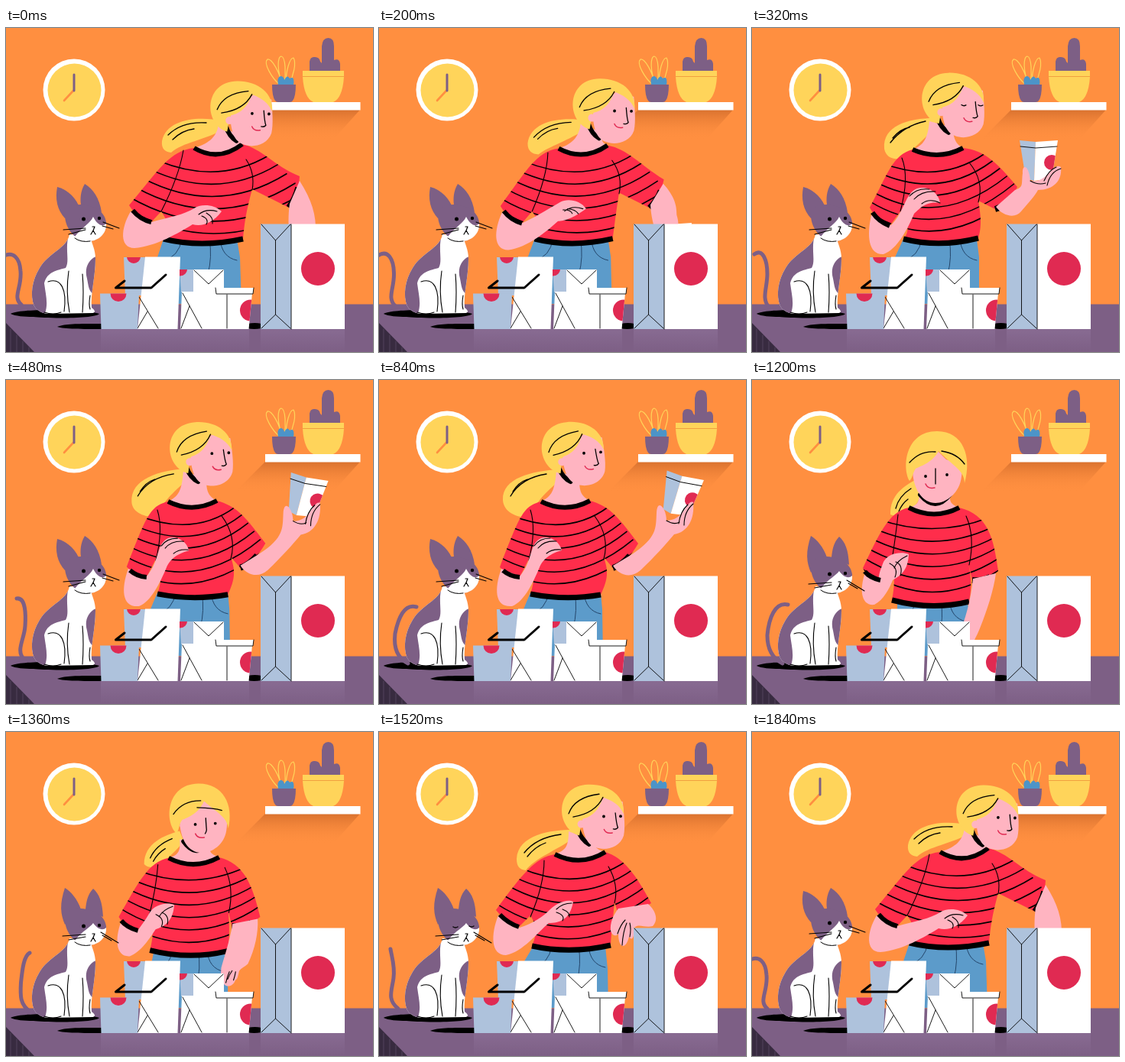
Write an HTML page with a canvas that moves like this. It is 480 by 424 pixels and loops after 1.88 s.

```html
<!DOCTYPE html>
<html lang="en">
<head>
<meta charset="utf-8">
<title>Unpacking dinner</title>
<style>
html, body { margin: 0; width: 100%; height: 100%; overflow: hidden; background: #ff8f40; }
canvas { display: block; width: 480px; height: 424px; }
</style>
</head>
<body>
<canvas id="stage" width="480" height="424"></canvas>
<script>
const g = document.getElementById('stage').getContext('2d');
const LOOP = 1880;
const C = {
  wall: '#ff8f40', plum: '#7d5f85', sun: '#ffd45a', red: '#ff2d4b', mark: '#e02a52',
  skin: '#ffb4c1', jeans: '#5c9bca', navy: '#24466b', side: '#aec2dc', ink: '#000', white: '#fff'
};
const NUM = /-?[\d.]+/g;
const nums = s => s.match(NUM).map(Number);
const lerp = (a, b, k) => a + (b - a) * k;

// Blends two path strings that share the same commands.
function mix(a, b, k) {
  const to = nums(b);
  let i = 0;
  return a.replace(NUM, v => lerp(+v, to[i++], k).toFixed(2));
}

function fill(path, color) {
  g.fillStyle = color;
  g.fill(new Path2D(path));
}
function line(path, w = 1.3, color = C.ink) {
  g.lineWidth = w;
  g.strokeStyle = color;
  g.stroke(new Path2D(path));
}
function dot(x, y, r, color) {
  g.fillStyle = color;
  g.beginPath();
  g.arc(x, y, r, 0, 7);
  g.fill();
}
function box(x, y, w, h, color) {
  g.fillStyle = color;
  g.fillRect(x, y, w, h);
}
function fade(y0, y1, from, to) {
  const grad = g.createLinearGradient(0, y0, 0, y1);
  grad.addColorStop(0, from);
  grad.addColorStop(1, to);
  return grad;
}
function clipped(path, draw) {
  g.save();
  g.clip(new Path2D(path));
  draw();
  g.restore();
}

const ease = {
  both: k => k * k * (3 - 2 * k),
  in: k => k ** 1.7,
  out: k => 1 - (1 - k) ** 2
};

// head: x, y, degrees, turn to the front; cup: x, y, degrees
const reach = {
  head: '53 15 4 0', cup: '388 330 0',
  pony: 'M282 122 C255 115 210 118 204 148 C203 158 208 162 216 163 C230 150 262 146 286 132Z',
  strand: 'M212 140 Q230 122 262 124 M218 146 Q230 134 246 132',
  neck: 'M278 125 C276 145 262 152 246 157 Q278 176 309 152 C304 150 302 148 303 140Z',
  shirt: 'M246 157 C215 160 200 185 161 232 Q172 250 190 254 L203 240 C214 255 212 265 206 276 Q255 288 310 276 C312 255 314 240 322 211 L370 235 Q384 215 384 194 C350 180 335 158 309 152 Q278 176 246 157Z',
  top: '200 174 278 206 345 166', low: '150 232 275 308 400 228',
  seam: 'M232 160 Q226 195 203 240 M314 172 Q326 190 322 212',
  pants: 'M206 276 L198 300 L196 361 L308 361 L306 300 L302 276Z',
  armL: 'M163 240 C150 262 148 288 168 288 C196 286 226 268 244 257 C256 260 270 256 282 240 C272 230 254 230 246 236 C234 244 212 248 190 254Z',
  tipsL: 'M276 240 Q262 236 252 244 M270 256 Q272 248 262 242 M262 257 Q266 250 256 246',
  armR: 'M371 230 C368 250 370 280 374 296 C378 310 382 315 386 318 C396 320 404 315 404 306 C404 300 404 295 404 290 C405 280 405 275 405 268 C406 245 400 225 384 200Z',
  tipsR: 'M396 306 Q390 310 388 316 M392 304 Q386 310 384 314 M380 306 Q384 310 388 308'
};
const lift = {
  head: '8 4 3 0', cup: '375 174 0',
  pony: 'M238 118 C205 118 170 128 173 158 C175 168 182 172 192 171 C205 165 220 150 242 128Z',
  strand: 'M181 150 Q198 128 227 122 M184 144 Q194 132 206 130',
  neck: 'M232 122 C230 145 224 154 210 159 Q244 174 276 157 C266 152 264 145 262 130Z',
  shirt: 'M210 159 C184 166 178 190 154 235 Q162 252 180 259 L194 240 C206 255 206 268 198 276 Q245 288 296 275 C300 260 300 250 296 226 L318 237 Q336 232 347 208 C322 178 305 160 276 157 Q244 174 210 159Z',
  top: '168 176 245 206 305 164', low: '148 238 245 304 352 214',
  seam: 'M196 170 Q206 195 194 240 M284 176 Q304 200 296 228',
  pants: 'M198 276 L187 300 L186 361 L297 361 L297 300 L294 276Z',
  armL: 'M156 245 C150 272 152 297 172 296 C190 290 204 262 212 243 C218 238 226 226 246 229 C244 214 228 206 216 210 C200 216 200 240 182 258Z',
  tipsL: 'M246 229 Q232 222 222 230 M240 214 Q222 213 212 224 M232 211 Q216 209 206 220',
  armR: 'M319 234 C328 246 344 250 352 240 C362 228 370 220 374 212 C394 212 406 200 404 182 C394 174 386 204 364 200 C362 178 353 178 354 190 C352 204 356 208 344 212Z',
  tipsR: 'M404 184 Q390 188 386 206 M398 182 Q388 186 382 200 M364 200 Q374 206 384 203'
};
const show = {
  head: '0 0 0 0', cup: '392 152 13',
  pony: 'M236 116 C200 118 162 130 164 160 C165 174 182 180 198 180 C204 160 215 150 240 128Z',
  strand: 'M172 152 Q186 128 219 123 M175 146 Q182 134 194 130',
  neck: 'M232 118 C230 145 226 152 212 159 Q244 175 276 158 C264 152 262 145 262 130Z',
  shirt: 'M212 159 C188 165 184 178 158 245 Q168 257 184 258 L196 234 C204 250 204 262 198 280 Q245 289 290 281 C300 260 300 250 294 232 L306 246 Q324 240 339 214 C310 175 300 165 276 158 Q244 175 212 159Z',
  top: '170 176 245 207 300 166', low: '150 243 245 300 340 220',
  seam: 'M198 170 Q206 195 196 236 M282 178 Q302 205 294 234',
  pants: 'M198 278 L189 300 L187 361 L293 361 L292 300 L290 278Z',
  armL: 'M160 247 C150 275 152 298 174 296 C190 290 202 264 210 245 C213 238 220 228 239 223 C236 210 222 203 212 207 C196 214 202 236 184 257Z',
  tipsL: 'M238 222 Q226 221 219 227 M232 211 Q216 210 208 220 M224 207 Q210 207 203 217',
  armR: 'M306 243 C314 256 330 260 342 249 C360 232 376 214 386 202 C404 199 413 182 411 160 C402 156 400 184 376 184 C376 168 364 154 363 174 C362 194 364 206 331 228Z',
  tipsR: 'M411 162 Q399 172 399 190 M404 163 Q394 172 392 188 M376 184 Q386 190 393 186'
};
const hold = { ...show, head: '-1 0 -1 0', cup: '394 151 14.5',
  pony: 'M236 117 C200 119 161 128 162 157 C163 174 182 181 199 180 C204 160 215 150 240 128Z' };
const place = {
  head: '-8 12 0 1', cup: '268 366 0',
  pony: 'M215 130 C200 138 180 150 181 176 C190 180 198 176 205 172 C215 165 220 155 222 145Z',
  strand: 'M188 168 Q192 152 208 142 M192 172 Q196 162 204 156',
  neck: 'M218 145 C220 160 216 164 205 167 Q238 184 271 167 C258 162 258 158 260 145Z',
  shirt: 'M205 167 C178 172 165 205 145 246 Q150 258 168 262 L182 240 C188 258 186 272 183 288 Q235 302 284 290 C288 270 286 255 283 240 L288 262 Q308 264 322 250 C316 205 308 176 271 167 Q238 184 205 167Z',
  top: '165 182 238 208 310 180', low: '136 242 236 312 330 244',
  seam: 'M191 176 Q188 205 182 242 M280 178 Q292 205 284 242',
  pants: 'M190 288 L190 305 L190 361 L286 361 L286 305 L280 288Z',
  armL: 'M148 252 C140 275 143 296 160 294 C172 288 180 272 184 262 C194 256 204 250 205 228 C196 224 178 226 172 238 C168 248 165 256 166 262Z',
  tipsL: 'M203 230 Q190 236 186 246 M194 256 Q198 242 188 238 M187 258 Q192 246 180 240',
  armR: 'M289 260 C286 290 278 315 272 330 C270 340 268 345 268 350 C272 358 284 358 288 350 C290 345 290 342 292 338 C294 334 296 330 298 325 C308 300 316 275 319 253Z',
  tipsR: 'M274 350 Q276 346 278 342 M280 350 Q282 346 284 342 M284 350 Q286 346 288 342'
};
const back = {
  head: '25 14 2 0', cup: '388 330 0',
  pony: 'M254 128 C225 128 182 134 180 166 C180 176 184 180 192 181 C204 165 232 155 256 138Z',
  strand: 'M190 158 Q206 138 238 134 M194 163 Q204 150 218 145',
  neck: 'M248 130 C248 150 244 155 230 160 Q264 177 296 157 C284 154 282 150 280 142Z',
  shirt: 'M230 160 C205 164 188 185 153 233 Q165 249 183 255 L198 240 C208 256 206 266 200 280 Q250 291 303 279 C304 260 306 245 308 222 L312 236 Q336 238 356 224 C335 185 320 165 296 157 Q264 177 230 160Z',
  top: '185 178 262 211 325 168', low: '145 236 256 312 368 222',
  seam: 'M216 168 Q216 200 198 242 M300 176 Q314 200 308 224',
  pants: 'M202 280 L190 300 L188 361 L300 361 L299 310 L296 280Z',
  armL: 'M156 240 C146 265 146 292 166 292 C188 288 208 262 222 250 C236 250 250 246 254 222 C246 218 232 224 224 232 C214 242 202 250 184 256Z',
  tipsL: 'M252 224 Q240 224 232 232 M249 242 Q250 236 240 232 M240 247 Q244 240 232 236',
  armR: 'M313 231 C306 240 302 250 303 260 C305 267 310 268 313 264 C313 284 323 285 327 268 C332 275 334 266 334 256 C340 250 348 257 358 254 C366 246 362 234 352 225Z',
  tipsR: 'M318 279 Q319 262 324 250 M312 264 Q316 252 322 246 M328 268 Q330 258 328 250'
};
const bodyKeys = [
  [0, reach], [80, reach], [320, lift, 'in'], [520, show, 'out'], [760, hold, 'both'], [880, hold],
  [1200, place, 'both'], [1520, back, 'in'], [1740, reach, 'out'], [LOOP, reach]
];

const curl = d => ({ d });
const tailLeft = curl('M-6 300 C10 290 18 302 19 318 C21 340 8 352 20 362');
const tailKeys = [
  [0, tailLeft], [80, tailLeft],
  [320, curl('M3 296 C14 288 20 304 20 322 C20 340 12 354 22 365'), 'both'],
  [480, curl('M14 286 C26 284 26 308 25 322 C24 340 12 354 24 366'), 'in'],
  [840, curl('M49 297 C33 292 25 312 21 332 C19 350 24 364 38 371'), 'out'],
  [1200, curl('M47 294 C30 290 22 312 20 334 C20 352 26 364 40 371'), 'both'],
  [1520, curl('M15 284 C17 296 21 306 19 322 C17 338 10 350 25 362'), 'both'],
  [1760, tailLeft, 'out'], [LOOP, tailLeft]
];

function poseAt(keys, t) {
  const i = keys.findIndex(k => k[0] > t);
  const [t0, a] = keys[i - 1], [t1, b, how] = keys[i];
  const k = how ? ease[how]((t - t0) / (t1 - t0)) : 0;
  const out = {};
  for (const part in a) out[part] = mix(a[part], b[part], k);
  return out;
}

// Each head part: side view, front view
const HEAD = {
  face: ['M240 92 C255 92 262 78 270 70 L293 76 C295 90 298 108 296 120 C292 135 275 140 265 138 C250 136 242 126 240 92Z',
    'M218 104 C228 92 243 90 250 80 L262 92 C284 98 284 104 282 114 C280 136 262 149 248 149 C232 149 218 132 218 104Z'],
  hair: ['M238 122 C206 114 203 58 247 55 C274 53 296 68 295 92 C290 80 278 74 267 71 C262 90 252 97 242 100 C238 105 240 112 238 122Z',
    'M214 120 C204 103 208 55 250 55 C284 55 296 88 286 123 C286 106 270 100 252 81 C244 96 230 100 222 104 C218 110 218 116 214 120Z'],
  locks: ['M223 94 Q230 72 262 67 M229 98 Q258 92 267 71', 'M214 96 Q228 80 248 82 M256 81 Q276 84 286 98'],
  nose: ['M284 91 Q286 106 288 110 Q286 113 282 112', 'M248 104 Q248 112 248 118 Q248 122 248 124'],
  smile: ['M270 113 Q273 119 281 117', 'M235 124 Q238 131 247 129'],
  band: ['M236 115 Q241 128 251 133', 'M228 138 Q248 162 267 138'],
  eyes: ['269 96 291 95', '235 114 263 112'],
  ear: ['240 107', '221 112']
};

function drawRoom() {
  box(0, 0, 480, 424, C.wall);
  dot(89, 81, 40.5, C.white);
  dot(89.5, 81.5, 35, C.sun);
  line('M88 82 L76 95', 2.6, C.wall);
  line('M89 61 L89 82', 3, C.plum);

  fill('M339 107 L463 107 L428 146 L300 146Z', fade(107, 146, '#d9722f', 'rgba(255,143,64,0)'));
  box(339, 97, 124.5, 10.5, C.white);
  line('M358 74 C348 66 336 46 342 41 C348 40 358 58 361 74 M362 74 C354 56 355 37 360 37 C366 38 366 60 364 74 M366 74 C366 56 371 39 376 39 C380 46 376 62 370 74', 1.2, C.sun);
  fill('M356 75 Q354 64 359 63 Q363 63 364 68 Q368 60 371 66 Q378 62 376 75Z', '#4c94c8');
  fill('M348 74 H379 Q379 90 375 95 Q374 97 371 97 H356 Q353 97 352 95 Q348 90 348 74Z', C.plum);
  fill('M397 57 V44 Q398 37 404 38 Q410 38 411 44 L413 46 V24 Q414 13 421.5 13 Q429 13 429 24 V42 Q436 39 437 47 V57Z', C.plum);
  fill('M388 56 H442 V64 Q440 92 428 97 H402 Q390 92 388 64Z', C.sun);
  line('M388 63.5 H442', 1, '#f0a040');

  box(0, 361.5, 480, 63, C.plum);
  fill('M0 386 L37 424 L0 424Z', '#382b40');
  for (let x = 6; x < 32; x += 8) line(`M${x} ${x + 388} V424`, 0.8, '#5b4966');
  const shine = fade(394, 424, '#886b92', C.plum);
  box(124, 394, 194, 30, shine);
  box(333, 394, 110, 30, shine);
  fill('M6 374 C20 366 110 369 122 374 C116 381 50 380 36 378 C24 378 12 377 6 374Z', C.ink);
  fill('M67 391 C76 386 110 387 126 387 V394 C100 394 76 394 67 391Z', C.ink);
  fill('M316 387 Q326 385 334 387 V393 Q324 395 316 393Z', C.ink);
}

function drawCup(pose) {
  const [x, y, turn] = nums(pose);
  const front = 'M-4 -25 L25 -27 L17 23 L-6 26Z';
  g.save();
  g.translate(x, y);
  g.rotate(turn * Math.PI / 180);
  fill('M-25 -27 L-4 -25 L-6 26 L-17 23Z', C.side);
  fill(front, C.white);
  clipped(front, () => dot(17, 2, 10, C.mark));
  line('M-24 -19 L-4 -17 L24 -19', 0.9);
  g.restore();
}

function drawHead(n, blink) {
  const part = name => mix(...HEAD[name], n[3]);
  g.save();
  g.translate(255 + n[0], 95 + n[1]);
  g.rotate(n[2] * Math.PI / 180);
  g.translate(-255, -95);
  line(part('band'), 6);
  fill(part('face'), C.skin);
  fill(part('hair'), C.sun);
  dot(...nums(part('ear')), 5 * (1 - n[3]), C.skin);
  line(part('locks'));
  line(part('nose'));
  line(part('smile'), 1.5, C.mark);
  const e = nums(part('eyes'));
  for (const i of [0, 2]) {
    if (blink) line(`M${e[i] - 3} ${e[i + 1]} q3 2 6 0`);
    else dot(e[i], e[i + 1], 1.9, C.ink);
  }
  g.restore();
}

function drawStripes(p) {
  const rows = 6;
  for (let i = 0; i < rows; i++) {
    const [x0, y0, cx, cy, x1, y1] = nums(mix(p.top, p.low, i / (rows - 1)));
    line(`M${x0} ${y0} Q${cx} ${cy} ${x1} ${y1}`, 1.6);
  }
}

// Strokes the stretch u..v of the curve whose numbers start at index i.
function hem(n, i, width, u = 0, v = 1) {
  const at = (a, b) => [0, 1].map(d => {
    const [p, q, r] = [n[i + d], n[i + 2 + d], n[i + 4 + d]];
    return lerp(lerp(p, q, a), lerp(q, r, a), b);
  });
  g.lineCap = 'butt';
  line(`M${at(u, u)} Q${at(u, v)} ${at(v, v)}`, width);
  g.lineCap = 'round';
}

function drawWoman(t) {
  const p = poseAt(bodyKeys, t);
  const head = nums(p.head), s = nums(p.shirt), w = nums(p.pants);

  fill(p.pony, C.sun);
  line(p.strand);
  fill(p.pants, C.jeans);
  const [wl, wy, wr] = [w[0], w[1], w[10]];
  line(`M${wl + 24} ${wy} Q${wl + 20} ${wy + 24} ${wl} ${wy + 28} M${wr - 22} ${wy} Q${wr - 20} ${wy + 24} ${wr} ${wy + 28} M${(wl + wr) / 2 + 12} ${wy} q4 24 -2 46`, 1, C.navy);
  fill(p.neck, C.skin);
  fill(p.shirt, C.red);
  clipped(p.shirt, () => drawStripes(p));
  line(p.seam, 1.1);
  hem(s, 40, 6);
  hem(s, 18, 7);
  drawHead(head, t >= 280 && t < 400);

  hem(s, 30, 8, 0, 0.65);
  if (t > 80 && t < 1200) drawCup(p.cup);
  fill(p.armR, C.skin);
  line(p.tipsR, 1.1);
  fill(p.armL, C.skin);
  line(p.tipsL, 1.1);
  hem(s, 6, 6, 0.2, 1);
}

function drawPackages() {
  // tall box
  fill('M154 300 H183 L181 350 H156Z', C.side);
  fill('M182 299.5 H228 L224.5 394 H172Z', C.white);
  clipped('M154 300 H183 V350 H154Z', () => dot(167, 299, 9, C.mark));
  line('M174 352 L199 393 M185 371 L172 393', 0.9);
  // low box
  fill('M123 347.5 H174 L172 394 H124.5Z', C.side);
  clipped('M123 347.5 H174 V394 H123Z', () => dot(147, 347.5, 10.5, C.mark));
  line('M155 331 L143.5 340 H190 L209 323', 3);
  // middle box
  fill('M227 316 H246 V346 H229Z', C.side);
  clipped('M227 316 H246 V346 H227Z', () => dot(228, 315.5, 9, C.mark));
  fill('M245 316 H285 V394 H228 L230 345 H245Z', C.white);
  line('M246 317 L265 335 L284 317 M231 347 L256 393 M240 364 L229 393', 0.9);
  // round tub
  const tub = 'M277 347 H322 L317.5 394 H280Z';
  fill(tub, C.white);
  clipped(tub, () => dot(320, 369.5, 14, C.mark));
  fill('M274 340 H324 L323 348 H275Z', C.white);
  line('M274 340 L275 348 H323 L324 340 M289 349 V393', 0.9);
  // carrier bag
  box(333, 256.5, 40.5, 137.5, C.side);
  box(373, 256.5, 70, 137.5, C.white);
  line('M373 257 V394 M334 257 L352.5 278 L372 257 M352.5 278 V375 M334 393 L352.5 375 L372 393', 0.9);
  dot(408, 315, 22, C.mark);
}

const CAT = {
  earL: ['M67 208 C64 224 67 238 77 249 L95 232 C88 218 78 211 67 208Z', 'M77 204 C70 225 71 238 77 252 L98 232 C93 218 85 209 77 204Z'],
  earR: ['M103 204 C97 214 97 224 98 232 L125 241 C122 222 114 211 103 204Z', 'M114 205 C106 213 105 224 104 232 L127 242 C126 222 122 212 114 205Z'],
  whiskers: ['M75 264 L104 262 M82 270 L104 264 M127 254 L148 262 M126 259 L140 263', 'M74 267 L104 265 M82 272 L104 268 M124 262 L147 276 M126 266 L138 273']
};

function drawCat(t) {
  line(poseAt(tailKeys, t).d, 5, C.plum);

  const body = 'M83 270 C80 288 56 294 44 314 C34 330 31 350 37 364 C41 371 50 374 56 374 L114 373 Q119 371 112 366 C110 350 117 325 117 302 C117 290 112 282 110 272Z';
  fill(body, C.white);
  clipped(body, () => {
    fill('M83 268 C76 288 84 304 78 314 C68 317 54 318 50 334 C52 350 56 362 50 376 L20 376 V280Z', C.plum);
    fill('M120 298 C108 302 102 314 106 328 C108 338 108 344 114 348Z', C.plum);
  });
  line('M55 332 C72 326 80 342 76 371 M82 318 Q78 345 83 372 M100 322 Q102 345 100 372 M50 372 Q62 376 72 372 M110 350 Q108 362 110 368', 1.1);

  const k = ease.both(Math.max(0, Math.min((t - 960) / 200, (1740 - t) / 180, 1)));
  const part = name => mix(...CAT[name], k);
  fill(part('earL'), C.plum);
  fill(part('earR'), C.plum);
  fill('M77 242 C76 260 88 277 106 279 C122 279 132 268 131 254 C129 240 116 232 98 231 C86 231 77 234 77 242Z', C.plum);
  const brow = 247 + 3 * k;
  fill(`M114 ${brow} C110 256 100 260 90 273 C98 279 104 279 108 279 C122 279 132 268 131 256 C126 261 119 257 114 ${brow}Z`, C.white);
  g.save();
  g.translate(0, 4 * k);
  if (t >= 1480 && t < 1600) line('M97 251 q3 2 6 0 M118 250 q3 2 6 0', 1.4);
  else {
    dot(101.5, 250, 2.5, C.ink);
    dot(122, 249, 2.2, C.ink);
  }
  line('M113 260 H116 L114 265 L111 270 M114 265 L117 270', 1.2);
  g.restore();
  line(part('whiskers'), 1.1);
  line('M90 275 Q98 281 110 279', 1);
}

function frame(now) {
  const step = Math.floor((now % LOOP) / 40) * 40;
  const t = step < 80 ? 0 : step;
  g.lineCap = g.lineJoin = 'round';
  drawRoom();
  drawWoman(t);
  drawPackages();
  drawCat(t);
}

const start = performance.now();
function tick() {
  frame(performance.now() - start);
  requestAnimationFrame(tick);
}
tick();
</script>
</body>
</html>
```
